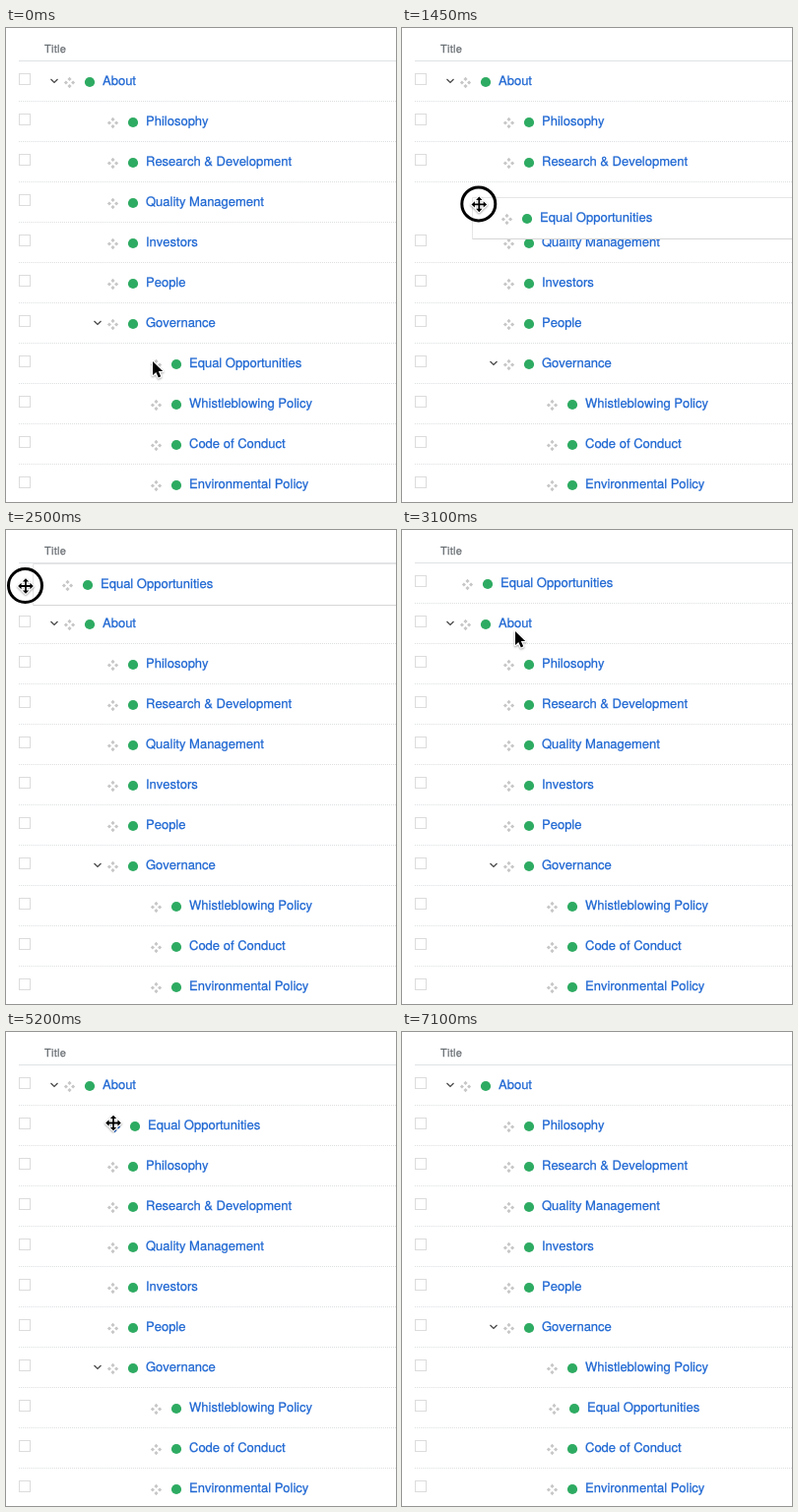
An HTML page with a canvas that plays this animation: 396x482 px, repeating every 7150 ms.

```html
<!DOCTYPE html>
<html lang="en">
<head>
<meta charset="utf-8">
<title>Page tree</title>
<style>
html, body { margin: 0; width: 100%; height: 100%; overflow: hidden; background: #fff; }
canvas { display: block; }
</style>
</head>
<body>
<canvas id="stage" width="396" height="482"></canvas>
<script>
const ctx = document.getElementById('stage').getContext('2d');
const LOOP = 7150, ROW = 41, INDENT = 44;
const PRESS = 60, LAG = 60, HIDE = 6300;
const BLUE = '#1d66d2', GREEN = '#2eab62', GREY = '#c6c6c6';

// [label, depth, expandable]
const pages = [
  ['About', 0, true], ['Philosophy', 1], ['Research & Development', 1],
  ['Quality Management', 1], ['Investors', 1], ['People', 1],
  ['Governance', 1, true], ['Whistleblowing Policy', 2],
  ['Code of Conduct', 2], ['Environmental Policy', 2]
];
const MOVED = 'Equal Opportunities';

// Pointer moves: [start, end, x, y]; it rests in between
const moves = [
  [0, 350, 152, 343], [350, 800, 79.5, 301.5], [800, 1950, 77.5, 97.5],
  [1950, 2450, 20, 57], [2650, 3100, 114, 102], [3300, 3650, 68.5, 58.5],
  [4330, 4900, 109, 92.5], [5300, 5850, 152, 384]
];
const drags = [[350, 2600], [4330, 5050], [5300, 5950]];

const clamp = (v, max) => Math.max(0, Math.min(max, v));
const rowY = slot => 54 + ROW * slot;
const labelX = depth => 98 + INDENT * depth;

function pointerAt(t) {
  let x = 148, y = 338;
  for (const [start, end, toX, toY] of moves) {
    const u = clamp((t - start) / (end - start), 1), k = u * u * (3 - 2 * u);
    x += (toX - x) * k;
    y += (toY - y) * k;
  }
  return { x, y };
}

// Where the row would land for the pointer at time t
function placeAt(t) {
  const y = pointerAt(t - LAG).y - 2.5;
  const depth = clamp(Math.round((pointerAt(t).x - 52) / INDENT), 2);
  return { y, depth, slot: clamp(Math.round((y - 54) / ROW), 8) };
}

function movedRow(t) {
  if (drags.some(([from, to]) => t >= from && t < to)) {
    const place = placeAt(t);
    return { ...place, x: labelX(place.depth) - 2, dragged: true };
  }
  const last = drags.filter(([, to]) => t >= to).pop();
  const { slot, depth } = last ? placeAt(last[1]) : { slot: 7, depth: 2 };
  return { slot, y: rowY(slot), x: labelX(depth) + (last ? 2 : 0), dragged: false };
}

function line(points, color, width, close) {
  ctx.beginPath();
  points.forEach(([x, y]) => ctx.lineTo(x, y));
  if (close) ctx.closePath();
  ctx.strokeStyle = color;
  ctx.lineWidth = width;
  ctx.stroke();
}

function text(label, x, y, size, color) {
  ctx.font = size + 'px "Helvetica Neue", "Liberation Sans", Arial, sans-serif';
  ctx.fontKerning = 'none';
  ctx.textRendering = 'geometricPrecision';
  ctx.fillStyle = ctx.strokeStyle = color;
  ctx.lineWidth = 0.25;
  ctx.fillText(label, x, y);
  ctx.strokeText(label, x, y);
}

function circle(x, y, r) {
  ctx.beginPath();
  ctx.arc(x, y, r, 0, 2 * Math.PI);
}

function handle(x, y, color) {
  ctx.fillStyle = color;
  for (let i = 0; i < 4; i++) {
    ctx.save();
    ctx.translate(x, y);
    ctx.rotate(i * Math.PI / 2 + Math.PI / 4);
    ctx.fillRect(1.1, 1.1, 2.9, 2.9);
    ctx.restore();
  }
}

function entry(label, x, y, open, iconColor = GREY) {
  if (open) line([[x - 52.5, y - 2], [x - 49, y + 1.5], [x - 45.5, y - 2]], '#444', 1.2);
  handle(x - 33.5, y + 1.5, iconColor);
  ctx.fillStyle = GREEN;
  circle(x - 13, y + 1, 5.1);
  ctx.fill();
  text(label, x, y + 4, 13, BLUE);
}

function rowFrame(y) {
  ctx.strokeStyle = '#dcdcdc';
  ctx.lineWidth = 1;
  ctx.strokeRect(13.5, y - 7.5, 11, 11);
  ctx.setLineDash([1, 1]);
  line([[13, y + 20.5], [396, y + 20.5]], '#dcdfe1', 1);
  ctx.setLineDash([]);
}

function helper(x, y) {
  const left = Math.round(x - 69) + 0.5;
  const top = Math.round(y - 21) + 0.5, bottom = top + 42;
  ctx.fillStyle = '#fff';
  ctx.fillRect(left, top, 396, 42);
  line([[left, bottom], [left, top], [396, top]], '#e6e6e6', 1);
  line([[left, bottom], [396, bottom]], '#d6d6d6', 1);
  entry(MOVED, x, Math.round(y));
}

function outlined(points, x, y) {
  ctx.save();
  ctx.translate(x, y);
  ctx.lineJoin = 'round';
  ctx.shadowColor = 'rgba(0, 0, 0, .35)';
  ctx.shadowBlur = 2;
  ctx.shadowOffsetY = 1;
  line(points, '#fff', 2.4, true);
  ctx.shadowColor = 'transparent';
  ctx.fillStyle = '#000';
  ctx.fill();
  ctx.restore();
}

const arrow = [[1, 1], [1, 15], [4.3, 12], [6.8, 17.4], [9.2, 16.3], [6.8, 11], [11.2, 11]];
// One arm, turned four times
const arm = [[-0.9, -0.9], [-0.9, -4.4], [-3.2, -4.4], [0, -7.8], [3.2, -4.4], [0.9, -4.4]];
const cross = [0, 1, 2, 3].flatMap(n => arm.map(([x, y]) =>
  [[x, y], [-y, x], [-x, -y], [y, -x]][n]));

function render(t) {
  const { x, y } = pointerAt(t);
  const row = movedRow(t);
  const hover = !row.dragged && t < HIDE &&
    Math.hypot(x - row.x + 33.5, y - row.y - 1.5) < 6;

  ctx.fillStyle = '#fff';
  ctx.fillRect(0, 0, 396, 482);
  ctx.letterSpacing = '0.3px';
  text('Title', 39, 25, 11, '#666b70');
  ctx.letterSpacing = '0px';
  line([[13, 33.5], [396, 33.5]], '#dfe2e4', 1);

  pages.forEach(([label, depth, open], i) => {
    const top = rowY(i + (i >= row.slot));
    rowFrame(top);
    entry(label, labelX(depth), top, open);
  });
  if (row.dragged) {
    helper(row.x, row.y);
  } else {
    rowFrame(row.y);
    entry(MOVED, row.x, row.y, false, hover ? BLUE : GREY);
  }

  if (drags.some(([from, to]) => t >= from - PRESS && t < to)) {
    circle(x - 0.5, y - 0.5, 17);
    ctx.strokeStyle = '#000';
    ctx.lineWidth = 3;
    ctx.stroke();
  }
  if (t < HIDE) outlined(row.dragged || hover ? cross : arrow, x, y);
}

function tick() {
  render(performance.now() % LOOP);
  requestAnimationFrame(tick);
}
tick();
</script>
</body>
</html>
```
